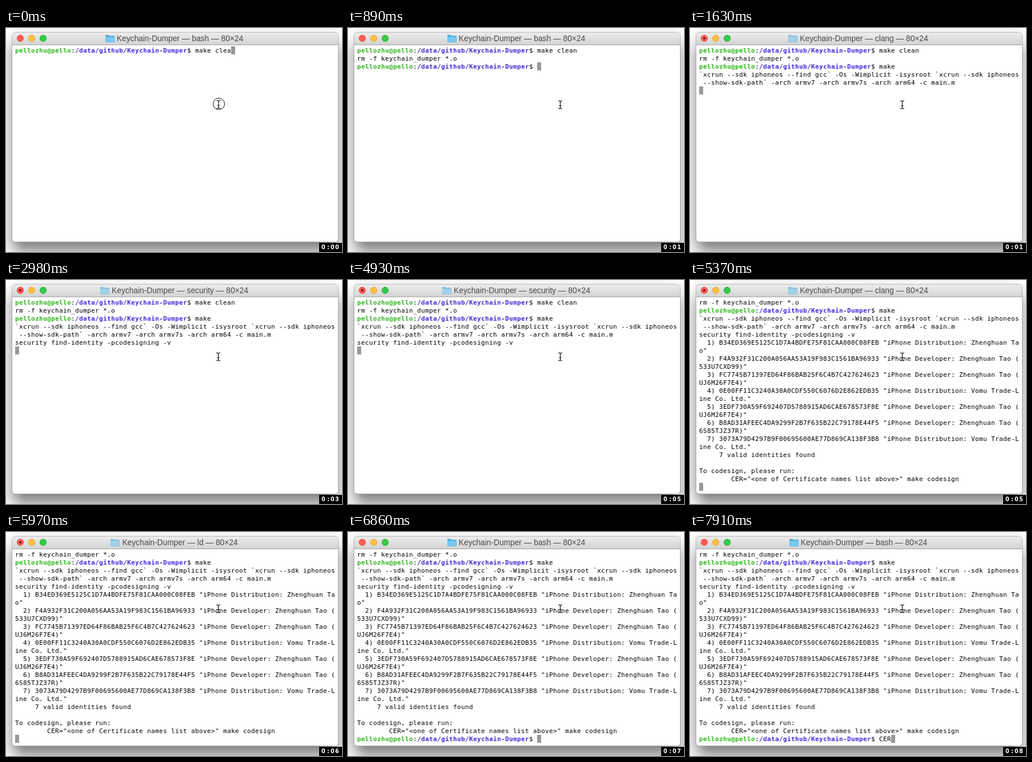
An HTML page that plays this animation: 588x391 px, repeating every 8 s.

```html
<!DOCTYPE html>
<html lang="en">
<head>
<meta charset="utf-8">
<title>Terminal session</title>
<style>
  html, body { margin: 0; width: 100%; height: 100%; overflow: hidden; background: #fff; }
  svg { display: block; width: 588px; height: 391px; }
  text { white-space: pre; }
  #rows { font: 11px "DejaVu Sans Mono", monospace; fill: #000; }
  .user, .path { font-weight: bold; }
  .user { fill: #2fb41d; }
  .path { fill: #4329d6; }
  #title { font: 13.75px "Liberation Sans", Arial, sans-serif; fill: #484848; text-anchor: middle; }
  #clock { font: bold 9.6px "DejaVu Sans", sans-serif; fill: #fff; }
</style>
</head>
<body>
<svg viewBox="0 0 588 391">
  <defs>
    <linearGradient id="bar" x2="0" y2="1">
      <stop stop-color="#ececec"/>
      <stop offset="1" stop-color="#d2d2d2"/>
    </linearGradient>
  </defs>
  <g id="shadow"></g>

  <rect x="10.5" y="7.5" width="571" height="366" rx="5.5" fill="#fff" stroke="#000" stroke-opacity=".25"/>
  <path d="M11 30V13a5 5 0 0 1 5-5H576a5 5 0 0 1 5 5V30Z" fill="url(#bar)"/>
  <path d="M11 29.5H581" stroke="#a6a6a6"/>
  <g stroke-width=".8">
    <circle cx="25" cy="18" r="5.7" fill="#fc5b57" stroke="#e2463f"/>
    <circle cx="45" cy="18" r="5.7" fill="#fdbe41" stroke="#e0a134"/>
    <circle cx="65" cy="18" r="5.7" fill="#34c84a" stroke="#27aa35"/>
  </g>
  <circle id="busy" cx="25" cy="18" r="2" fill="#6e0f0a"/>

  <g id="folder">
    <path d="M0 1.5Q0 0 1.5 0H5L6.5 1.5H14.5Q16 1.5 16 3V11.5Q16 13 14.5 13H1.5Q0 13 0 11.5Z" fill="#4fa9d8"/>
    <path d="M.5 3.5H15.5V11.5Q15.5 12.5 14.5 12.5H1.5Q.5 12.5 .5 11.5Z" fill="#76caf3"/>
  </g>
  <text id="title" x="304.5" y="23"></text>

  <rect id="caret" width="7" height="14" fill="#999"/>
  <g id="rows"></g>

  <circle id="ring" cx="372.5" cy="132.5" r="10" fill="#fff" stroke="#000"/>
  <g id="pointer" fill="none">
    <path id="beam" d="M368 127Q371.5 127 371.5 129.5Q371.5 127 375 127M371.5 129V139M368 141Q371.5 141 371.5 138.5Q371.5 141 375 141M369.5 135.5H373.5" stroke="#000" stroke-width="1.1"/>
  </g>

  <rect x="548" y="375" width="40" height="16"/>
  <text id="clock" x="552 562 568 576" y="386"></text>
</svg>

<script>
const LOOP = 8000, COLS = 80, ROWS = 24, CELL = 7, LINE = 14, LEFT = 16, TOP = 32;
const USER = 'pellozhu@pello', PATH = '/data/github/Keychain-Dumper';
const PROMPT = `${USER}:${PATH}$ `;
const PERSON = 'Zhenghuan Tao', FIRM = 'Vomu Trade-Line Co. Ltd.';

const dev = id => `Developer: ${PERSON} (${id})`;
const identities = [
  ['B34ED369E5125C1D7A4BDFE75F81CAA000C08FEB', `Distribution: ${PERSON}`],
  ['F4A932F31C200A056AA53A19F983C1561BA96933', dev('533U7CXD99')],
  ['FC7745B71397ED64F86BAB25F6C4B7C427624623', dev('UJ6M26F7E4')],
  ['0E00FF11C3240A30A0CDF550C6076D2E862EDB35', `Distribution: ${FIRM}`],
  ['3EDF730A59F692407D5788915AD6CAE678573F8E', dev('UJ6M26F7E4')],
  ['B8AD31AFEEC4DA9299F2B7F635B22C79178E44F5', dev('6S85TJZ37R')],
  ['3073A79D4297B9F00695600AE77D869CA138F3B8', `Distribution: ${FIRM}`]
].map(([hash, name], i) => `  ${i + 1}) ${hash} "iPhone ${name}"\n`);

// Text appended to the terminal, by time.
const output = [
  [0, PROMPT + 'make clea'],
  [140, 'n'],
  [290, '\nrm -f keychain_dumper *.o\n'],
  [440, PROMPT],
  [1190, 'ma'],
  [1340, 'ke'],
  [1490, '\n`xcrun --sdk iphoneos --find gcc` -Os -Wimplicit -isysroot `xcrun --sdk iphoneos' +
         ' --show-sdk-path` -arch armv7 -arch armv7s -arch arm64 -c main.m\n'],
  [2230, 'security find-identity -pcodesigning -v\n'],
  [5220, identities.slice(0, 3).join('')],
  [5370, identities.slice(3).join('') + '     7 valid identities found\n\n' +
         'To codesign, please run:\n' +
         '        CER="<one of Certificate names list above>" make codesign\n'],
  [6260, PROMPT],
  [7160, 'C'],
  [7310, 'E'],
  [7460, 'R']
];
const processes = [
  [0, 'bash'], [440, 'rm'], [590, 'bash'], [1630, 'clang'],
  [2230, 'security'], [5370, 'clang'], [5520, 'ld'], [6260, 'bash']
];
const ticks = [890, 1930, 2980, 3880, 4930, 5970, 6860, 7910];

const $ = id => document.getElementById(id);
const set = (el, attrs) => { for (const k in attrs) el.setAttribute(k, attrs[k]); };
const esc = s => s.replace(/&/g, '&amp;').replace(/</g, '&lt;');
const wrap = line => line.match(new RegExp(`.{1,${COLS}}`, 'g')) || [''];
const past = (list, t) => list.filter(([at]) => at <= t);

function drawShadow() {
  let rings = '';
  for (let d = 30; d >= -18; d -= 4) {
    const grey = Math.round(255 * (1 - 0.55 / (1 + Math.exp(d / 9.5))));
    rings += `<rect x="${11 - d}" y="${26 - d}" width="${570 + 2 * d}" height="${365 + 2 * d}"` +
      ` rx="${Math.max(10, d + 26)}" fill="rgb(${grey},${grey},${grey})"/>`;
  }
  $('shadow').innerHTML = rings;
}

function styled(row) {
  if (!row.startsWith(PROMPT)) return esc(row);
  return `<tspan class="user">${USER}</tspan>:<tspan class="path">${PATH}</tspan>$ ` +
    esc(row.slice(PROMPT.length));
}

function drawTerminal(text) {
  const rows = text.split('\n').flatMap(wrap).slice(-ROWS);
  $('rows').innerHTML = rows.map((row, i) => {
    const xs = [...row].map((_, c) => LEFT + c * CELL).join(' ');
    return row && `<text x="${xs}" y="${TOP + i * LINE + 11}">${styled(row)}</text>`;
  }).join('');
  const last = rows.length - 1;
  set($('caret'), { x: LEFT + rows[last].length * CELL, y: TOP + last * LINE });
}

function drawTitle(name) {
  const idle = name === 'bash';
  $('title').textContent = `Keychain-Dumper — ${name} — 80×24`;
  const x = Math.round(304.5 - $('title').getComputedTextLength() / 2 - 20);
  set($('folder'), { transform: `translate(${x} 12)`, opacity: idle ? 1 : 0.6 });
  set($('busy'), { visibility: idle ? 'hidden' : 'visible' });
}

let shown = '';
function render(t) {
  const text = past(output, t).map(([, s]) => s).join('');
  const name = past(processes, t).pop()[1];
  const seconds = ticks.filter(at => at <= t).length;
  const clicking = t < 140;
  const state = [text.length, name, seconds].join();
  if (state === shown) return;
  shown = state;
  drawTerminal(text);
  drawTitle(name);
  $('clock').textContent = `0:0${seconds}`;
  set($('ring'), { visibility: clicking ? 'visible' : 'hidden' });
  set($('pointer'), { transform: clicking ? 'translate(.5 -.5)' : '' });
}

const start = performance.now();
function frame() {
  render((performance.now() - start) % LOOP);
  requestAnimationFrame(frame);
}
drawShadow();
frame();
</script>
</body>
</html>
```
